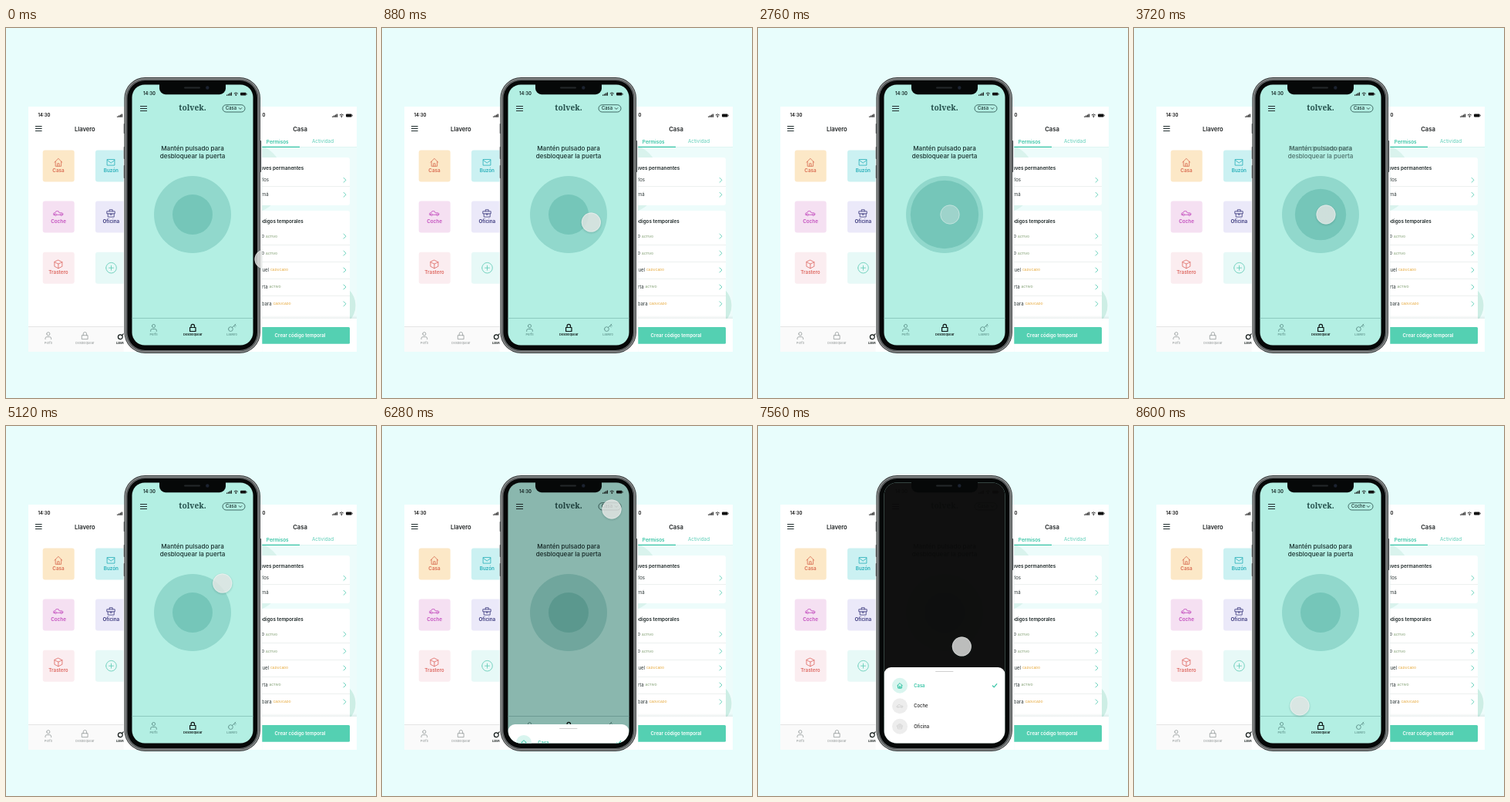
An HTML page with a canvas that plays this animation: 480 by 480 pixels, repeating every 8640 ms.

```html
<!DOCTYPE html>
<html lang="es">
<head>
<meta charset="utf-8">
<title>Llavero digital</title>
<style>
html, body { margin: 0; width: 100%; height: 100%; overflow: hidden; background: #e8fdfc; }
canvas { display: block; width: 480px; height: 480px; }
</style>
</head>
<body>
<canvas id="stage"></canvas>
<script>
const LOOP = 8640;
const canvas = document.getElementById('stage');
const ctx = canvas.getContext('2d');
const ratio = Math.max(1, window.devicePixelRatio || 1);
canvas.width = canvas.height = 480 * ratio;

const TEAL = '#35c4a5';
const INK = '#18302e';

// Icons live in a box about 12 units wide, centred on the origin.
const icons = {
  home: 'M-5 0L0 -5L5 0M-3.7 -1V5H3.7V-1M-1.2 5V1.5H1.2V5',
  mail: 'M-4.7 -3.8H4.7V3.8H-4.7ZM-4.7 -2.8L0 .8L4.7 -2.8',
  car: 'M-6 2V-.3H-4.5L-3 -2.6H.2L1.2 -.5H4.6L6 .4V2H5M-6 2H-4.8M-2.4 2H2.6M-4.8 2a1.2 1.2 0 1 0 2.4 0a1.2 1.2 0 1 0 -2.4 0M2.6 2a1.2 1.2 0 1 0 2.4 0a1.2 1.2 0 1 0 -2.4 0',
  work: 'M-5 -2.5H5V.6H-5ZM-4 .6V4.8H4V.6M-2 -2.5V-4.6H2V-2.5M-1 .6V1.9H1V.6',
  box: 'M0 -5.3L5 -2.8V2.8L0 5.3L-5 2.8V-2.8ZM-5 -2.8L0 -.4L5 -2.8M0 -.4V5.3',
  plus: 'M-6.8 0a6.8 6.8 0 1 0 13.6 0a6.8 6.8 0 1 0 -13.6 0M-3 0H3M0 -3V3',
  user: 'M-2.1 -2.4a2.1 2.1 0 1 0 4.2 0a2.1 2.1 0 1 0 -4.2 0M-3.8 4.5V3.4Q-3.8 1.5 -1.8 1.5H1.8Q3.8 1.5 3.8 3.4V4.5',
  lock: 'M-3.7 -.5H3.7V4.5H-3.7ZM-2.2 -.5V-2.4a2.2 2.2 0 0 1 4.4 0V-.5',
  key: 'M-4.6 1.6a2.9 2.9 0 1 0 5.8 0a2.9 2.9 0 1 0 -5.8 0M.4 -.5L4.8 -4.7M2.6 -2.6L4.2 -1M4 -4L5.3 -2.7',
  next: 'M-1.5 -3L1.5 0L-1.5 3',
  down: 'M-1.8 -.9L0 .9L1.8 -.9',
  check: 'M-2.6 .2L-.8 2L2.8 -2.2'
};
for (const name in icons) icons[name] = new Path2D(icons[name]);

const clamp = v => Math.min(1, Math.max(0, v));
const ramp = (t, a, b) => clamp((t - a) / (b - a));
const ease = (t, a, b) => { const u = ramp(t, a, b); return u * u * (3 - 2 * u); };

function text(str, x, y, size, color, weight = 400, align = 'center', family = 'Inter, "Noto Sans", sans-serif') {
  ctx.font = `${weight} ${size}px ${family}`;
  ctx.textAlign = align;
  ctx.textBaseline = 'alphabetic';
  ctx.fillStyle = color;
  ctx.fillText(str, x, y + size * 0.36);
}

function box(x, y, w, h, color, r = 0) {
  ctx.beginPath();
  ctx.roundRect(x, y, w, h, r);
  ctx.fillStyle = color;
  ctx.fill();
}

function disc(x, y, r, color) {
  ctx.beginPath();
  ctx.arc(x, y, r, 0, 7);
  ctx.fillStyle = color;
  ctx.fill();
}

function clipped(x, y, w, h, r, draw) {
  ctx.save();
  ctx.beginPath();
  ctx.roundRect(x, y, w, h, r);
  ctx.clip();
  draw();
  ctx.restore();
}

function icon(name, x, y, color, width = 0.8, scale = 1) {
  ctx.save();
  ctx.translate(x, y);
  ctx.scale(scale, scale);
  ctx.strokeStyle = color;
  ctx.lineWidth = width / scale;
  ctx.lineCap = ctx.lineJoin = 'round';
  ctx.stroke(icons[name]);
  ctx.restore();
}

function menu(x, y, w) {
  for (let i = -1; i < 2; i++) box(x, y + i * 3 - 0.4, w, 0.9, '#222f30');
}

function status(x, y) {
  for (let i = 0; i < 4; i++) box(x + i * 1.9, y + 1.2 - i, 1.3, 1.3 + i, '#111', 0.3);
  ctx.strokeStyle = '#111';
  ctx.lineWidth = 0.9;
  for (const r of [1.7, 3.5]) {
    ctx.beginPath();
    ctx.arc(x + 12.3, y + 2.3, r, -2.35, -0.79);
    ctx.stroke();
  }
  disc(x + 12.3, y + 2, 0.7, '#111');
  box(x + 18, y - 1.6, 7.6, 3.9, '#111', 1);
  box(x + 26, y - 0.4, 0.6, 1.5, '#111');
}

function tile(x, y, bg, name, label, color) {
  box(x, y, 41, 41, bg, 3);
  if (!label) return icon(name, x + 20.5, y + 20.5, color, 0.8);
  icon(name, x + 20.2, y + 15.8, color, 0.8);
  text(label, x + 20.3, y + 26, 6.3, color, 600);
}

function tabBar(x, gap, y, active, grey) {
  const tabs = [['user', 'Perfil'], ['lock', 'Desbloquear'], ['key', 'Llavero']];
  tabs.forEach(([name, label], i) => {
    const on = i === active;
    icon(name, x + gap * i, y, on ? '#0d1514' : grey, on ? 1.2 : 0.75);
    text(label, x + gap * i, y + 9, 4, on ? '#0d1514' : grey, on ? 600 : 400);
  });
}

function leftPanel() {
  text('14:30', 49.5, 113.2, 5.9, '#111', 600);
  status(144, 113.2);
  menu(38, 130.5, 8.6);
  text('Llavero', 102.3, 130.8, 7.6, '#202425', 600);
  tile(47.7, 158.5, '#fce8c7', 'home', 'Casa', '#d96a50');
  tile(116, 158.5, '#cbf1f2', 'mail', 'Buzón', '#25aeb8');
  tile(47.7, 224.5, '#f5e0f2', 'car', 'Coche', '#c24bbd');
  tile(116, 224.5, '#ebe9f9', 'work', 'Oficina', '#38367c');
  tile(47.7, 290.7, '#fbedf0', 'box', 'Trastero', '#de6861');
  tile(116, 290.7, '#e7f9f7', 'plus', '', '#5bcab3');
  box(29, 387, 140, 33, '#fafafa');
  box(29, 387, 140, 0.7, '#dedede');
  tabBar(54.8, 47.6, 399.2, 2, '#8d9393');
}

function person(name, x, y, active) {
  text(name, x, y, 6, '#2a3434', 400, 'right');
  if (active === undefined) return;
  text(active ? 'ACTIVO' : 'CADUCADO', x + 2, y, 4, active ? '#819f72' : '#e6a83b', 500, 'left');
}

function rightPanel() {
  box(320, 102, 135, 318, '#edfcfb');
  disc(314, 195, 46, '#d9f3ed');
  disc(425, 360, 28.5, '#cdeee5');
  box(320, 102, 135, 52.5, '#fff');
  text('14:30', 328.3, 113.2, 5.9, '#111', 600);
  status(423, 113.2);
  text('Casa', 381.5, 130.8, 7.7, '#202425', 600);
  text('Permisos', 352.2, 147.2, 6.4, TEAL, 600);
  text('Actividad', 411, 147.2, 6.35, '#5fcfb9');
  box(320, 154.2, 135, 0.6, '#c9eee7');
  box(320, 153.8, 61, 1.3, TEAL);
  box(320, 168, 126, 62, '#fff', 3);
  box(320, 237, 126, 145, '#fff', 3);
  text('Llaves permanentes', 386.3, 181.8, 6.3, '#1d2727', 600, 'right');
  text('Códigos temporales', 385.7, 250.8, 6.3, '#1d2727', 600, 'right');
  person('Carlos', 341, 197.3);
  person('Mamá', 340.5, 216.3);
  person('Pedro', 335, 270.2, true);
  person('Pablo', 335, 292.2, true);
  person('Miguel', 341, 314, false);
  person('Marta', 339.5, 336, true);
  person('Bárbara', 344.5, 357.8, false);
  for (const y of [205, 281, 303, 325, 347]) box(320, y, 126, 0.8, '#e6ebea');
  for (const y of [197.3, 216.3, 270.2, 292.2, 314, 336, 357.8]) icon('next', 439.5, y, '#4fcab0', 0.85);
  const shade = ctx.createLinearGradient(0, 373, 0, 377);
  shade.addColorStop(0, 'rgba(90,130,125,0)');
  shade.addColorStop(1, 'rgba(90,130,125,.12)');
  box(320, 373, 135, 4, shade);
  box(320, 377, 135, 43, '#fff');
  box(320, 388, 126, 21.7, '#54d0b2', 1.5);
  text('Crear código temporal', 381.5, 399, 6.1, '#fff', 600);
}

function phoneBody() {
  for (const [y, h] of [[124, 13], [154, 16], [178, 17]]) box(152.7, y, 2, h, '#5d6163', 0.8);
  box(329, 146, 2.2, 41, '#5d6163', 0.8);
  // Metal rim: [inset, colour], from the outside in.
  const rim = [[0, '#343738'], [0.9, '#8e9191'], [2.4, '#4a4d4e'], [3.2, '#74787a'], [4, '#060808']];
  for (const [d, color] of rim) box(153.4 + d, 64 + d, 176.6 - 2 * d, 358 - 2 * d, color, 27 - d);
}

function pill(label) {
  const w = label === 'Casa' ? 29 : 32;
  const x = 310 - w;
  ctx.beginPath();
  ctx.roundRect(x, 99.7, w, 9.3, 4.65);
  ctx.strokeStyle = '#244b47';
  ctx.lineWidth = 0.8;
  ctx.stroke();
  text(label, x + 4, 104.4, 5.8, INK, 500, 'left');
  icon('down', 304, 104.5, INK, 0.8);
}

function fade(alpha, draw) {
  if (alpha <= 0) return;
  ctx.save();
  ctx.globalAlpha = alpha;
  draw();
  ctx.restore();
}

function unlockScreen(t) {
  box(160, 70, 164, 345, '#b3efe3');
  text('14:30', 186, 85.3, 5.9, '#10201f', 600);
  status(286, 85.3);
  menu(174, 104.5, 9);
  text('tolvek.', 242, 103.6, 10.2, '#24504c', 700, 'center', '"Noto Serif", serif');
  pill(t < 8200 ? 'Casa' : 'Coche');

  const open = ramp(t, 3100, 3260) - ramp(t, 3560, 3800);
  fade(1 - open, () => {
    text('Mantén pulsado para', 242, 156.4, 8.1, INK, 500);
    text('desbloquear la puerta', 242, 166.4, 8.1, INK, 500);
  });
  fade(open, () => text('Puerta desbloqueada', 242, 156.4, 8.1, INK, 500));

  const grow = ramp(t, 1700, 3100) - ease(t, 3466, 3866);
  disc(242, 242, 50, '#91d8cc');
  disc(242, 242, 26 + 24 * grow, '#75c6b9');

  box(160, 376.3, 164, 0.7, '#7fbdb3');
  tabBar(191.5, 50.8, 389, 1, '#4f827b');
}

function sheet(t) {
  const up = ease(t, 6150, 6550) - ease(t, 8200, 8540);
  if (up <= 0) return;
  box(160, 70, 164, 345, `rgba(11,10,10,${0.97 * up})`);
  const y = 412 - 99 * up;
  box(163.5, y, 157, 120, '#fff', 9);
  box(230, y + 5, 23.5, 0.9, '#cfcfcf', 0.4);
  const chosen = t < 8180 ? 0 : 1;
  const rows = [['home', 'Casa'], ['car', 'Coche'], ['work', 'Oficina']];
  rows.forEach(([name, label], i) => {
    const cy = y + 23.8 + 26.5 * i;
    const on = i === chosen;
    disc(184, cy, 10, on ? '#d9f5ef' : '#ededed');
    icon(name, 184, cy, on ? TEAL : '#d6d6d6', 1, 0.65);
    text(label, 202.3, cy, 5.8, on ? TEAL : '#222', on ? 600 : 500, 'left');
    if (on) icon('check', 307, cy, TEAL, 1.2);
  });
}

function notch() {
  box(199, 68, 86, 18.2, '#060808', [0, 0, 8, 8]);
  box(231, 76.5, 21, 2, '#24282a', 1);
  disc(261.3, 77.5, 2.2, '#1c2330');
}

// Quadratic path from a to c, bent towards b.
function along(a, b, c, s) {
  const q = i => (1 - s) * (1 - s) * a[i] + 2 * s * (1 - s) * b[i] + s * s * c[i];
  return [q(0), q(1)];
}

function pointerAt(t) {
  const ring = [249, 242], menuTap = [298, 108];
  if (t < 4490) return along([335, 300], [288, 256], ring, ease(t, 0, 1350));
  if (t < 6950) return along(ring, [293, 220.5], menuTap, ease(t, 4490, 5840));
  return along(menuTap, [281.4, 310], [215, 363], ease(t, 6950, 8090));
}

function press(t, a, b) {
  return ramp(t, a, a + 90) - ramp(t, b, b + 90);
}

function pointer(t) {
  const [x, y] = pointerAt(t);
  const down = press(t, 1640, 3150) + press(t, 5920, 6080) + press(t, 8090, 8220);
  const glow = ctx.createRadialGradient(x, y + 1, 11, x, y + 1, 15);
  glow.addColorStop(0, `rgba(20,60,55,${0.16 * (1 - down)})`);
  glow.addColorStop(1, 'rgba(20,60,55,0)');
  disc(x, y + 1, 15, glow);
  disc(x, y, 12.5, `rgba(236,236,235,${0.78 - 0.43 * down})`);
  ctx.beginPath();
  ctx.arc(x, y, 12.2, 0, 7);
  ctx.strokeStyle = 'rgba(255,255,255,.45)';
  ctx.lineWidth = 0.8;
  ctx.stroke();
}

function draw(t) {
  ctx.setTransform(ratio, 0, 0, ratio, 0, 0);
  box(0, 0, 480, 480, '#e8fdfc');
  box(29, 102, 426, 318, '#fff');
  clipped(29, 102, 123.5, 318, 0, leftPanel);
  clipped(332.3, 102, 122.7, 318, 0, rightPanel);
  phoneBody();
  clipped(163.5, 73.5, 157, 338, 16.5, () => {
    unlockScreen(t);
    sheet(t);
  });
  notch();
  clipped(0, 0, 332.3, 480, 0, () => pointer(t));
}

function tick() {
  draw(performance.now() % LOOP);
  requestAnimationFrame(tick);
}
tick();
</script>
</body>
</html>
```
